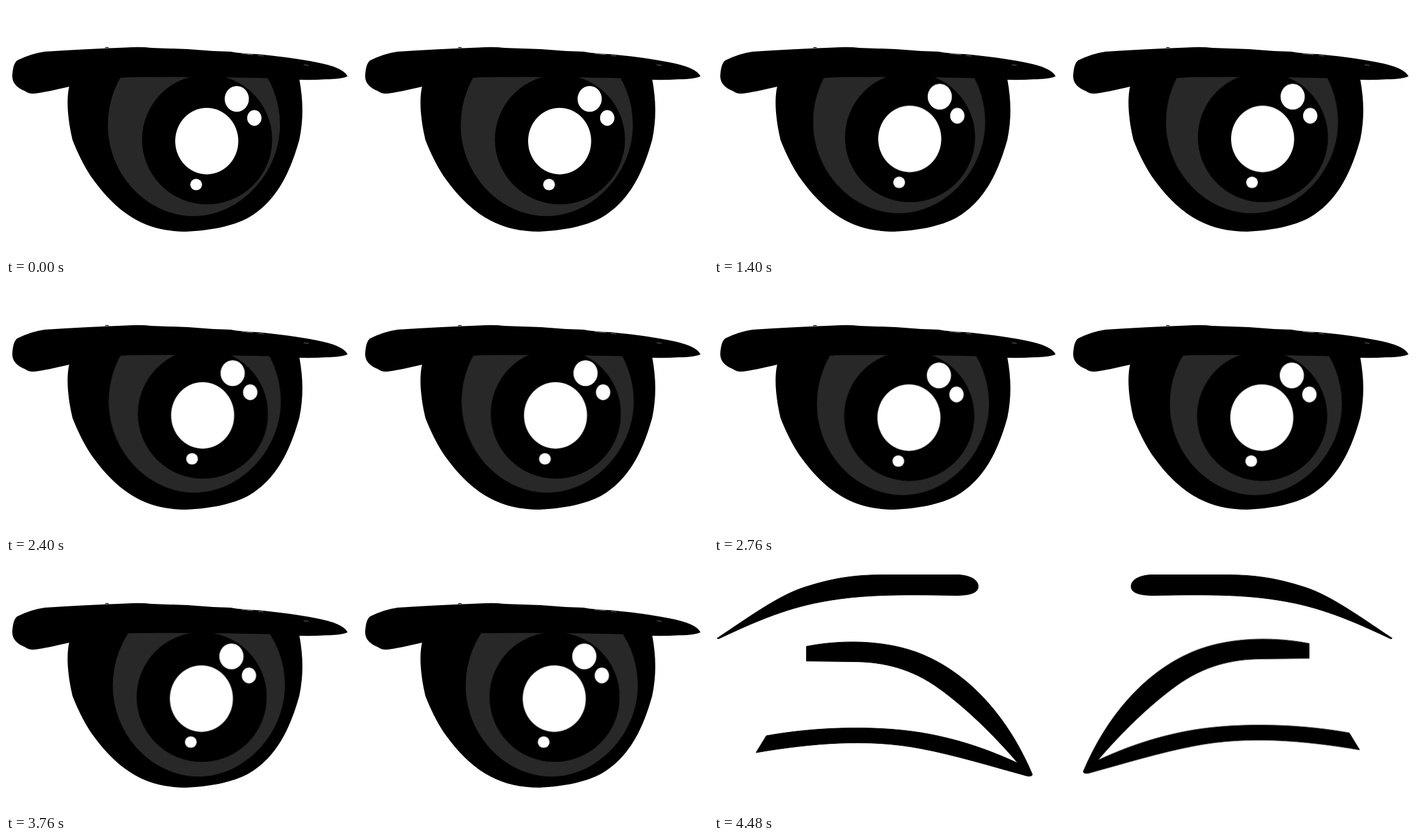
Write an HTML page that moves like this. It is 1120 px wide and 400 px high and loops after 4640 ms.

```html
<!DOCTYPE html>
<html lang="en">
<head>
<meta charset="utf-8">
<title>Wandering eyes</title>
<style>
  html, body { margin: 0; width: 100%; height: 100%; overflow: hidden; background: #fff; }
  svg { display: block; width: 1120px; height: 400px; }

  .iris, .pupil, .open, .squint { animation: 4640ms linear infinite; }
  .iris { animation-name: iris; fill: #282828; }
  .pupil { animation-name: pupil; }
  .open { animation-name: open; animation-timing-function: step-end; }
  .squint { animation-name: squint; animation-timing-function: step-end; stroke: #000; stroke-linejoin: round; }

  @keyframes iris {
    0% { transform: translate(0, 0); }
    15.9% { transform: translate(-5.7px, -6.2px); }
    25% { transform: translate(-6.7px, -3.7px); }
    43.1% { transform: translate(1px, -6.8px); }
    73.3% { transform: translate(2.2px, 8.5px); }
    92.9%, 100% { transform: translate(16.5px, 4.9px); }
  }
  @keyframes pupil {
    0% { transform: translate(0, 0); }
    25% { transform: translate(-8.9px, -2.2px); }
    47.6% { transform: translate(-5.1px, -7.9px); }
    73.3% { transform: translate(-14.2px, 4px); }
    92.9%, 100% { transform: translate(0, 0); }
  }
  @keyframes open { 0% { opacity: 1; } 96.55%, 100% { opacity: 0; } }
  @keyframes squint { 0% { opacity: 0; } 96.55%, 100% { opacity: 1; } }
</style>
</head>
<body>
<svg viewBox="0 0 1120 400">
  <defs>
    <clipPath id="below-lid">
      <path d="M90 118 L150 117 L195 114 Q290 112.4 420 115.5 L490 117 V400 H90 Z"/>
    </clipPath>
    <g id="ball">
      <path d="M101 128 C96 148 98 180 106 214 C114 235 124 255 135 272 C178 333 222 361 288 361
               C325 359 361 353 388 338 C435 310 455 260 468 214 C475 180 474 150 468 117
               L300 100 Z"/>
      <path d="M10 112 Q11 92 18 87 Q40 76 62 73 Q128 68.5 190 66.5 Q215 65 232 67
               L290 69 L330 72 L358 73 Q375 76 400 77 Q455 82 495 90 Q538 98 545 112.5
               Q536 117 510 117.3 Q490 118.5 468 118 L200 120 L101 129
               Q62 138 50 139.5 Q38 142 30 136 Q10 128 10 112 Z"/>
      <path d="M158 67 L161 66 L164 67" stroke="#000"/>
      <path d="M376 76.5 L394 78 M402 79.3 L411 79.8 M475 94 L483 95"
            stroke="#fff" stroke-width=".4" fill="none"/>
    </g>
    <path id="ring" d="M162.5 190.3 A137.3 145.9 0 0 1 437.1 190.3
      C437.1 267.6 372.6 336.2 299.8 336.2 C225 336.2 162.5 269.8 162.5 190.3 Z"/>
    <g id="core">
      <circle cx="320.8" cy="213.6" r="103.8"/>
      <g fill="#fff">
        <ellipse cx="320.3" cy="216.2" rx="50.3" ry="53.2"/>
        <ellipse cx="368.2" cy="148.6" rx="19.3" ry="20.6"/>
        <ellipse cx="396.2" cy="179.2" rx="11.4" ry="12.6"/>
        <ellipse cx="303.4" cy="285.7" rx="9.4" ry="9.1"/>
      </g>
    </g>
    <path id="brow" d="M5 122 C62 84 108 50 152 38 C200 23 235 20.5 275 20.5 H390
      C412 22 421.5 30 421.5 39 C421.5 48 412 53 388 53.5 C300 52 230 51 160 66 C100 79 50 103 7 123 Z"/>
    <path id="shut" d="M147.5 135 C213 122 285 127 335 149 C412 182 472 254 508 340
      Q507 343.5 500 342.5 C440 326 385 309 330 298.5 C245 282 155 290 67 305 L83.5 278
      C160 264 255 261 330 273 C390 283 440 301 485 322 C445 275 400 232 360 203
      C315 170 270 160 225 159.5 L147.5 158.5 Z"/>
    <g id="eye">
      <use href="#ball"/>
    </g>
  </defs>

  <g class="open">
    <g>
      <use href="#eye"/>
      <g clip-path="url(#below-lid)">
        <g class="iris"><use href="#ring"/></g>
        <g class="pupil"><use href="#core"/></g>
      </g>
    </g>
    <g transform="translate(563 0)">
      <use href="#eye"/>
      <g clip-path="url(#below-lid)">
        <g class="iris"><use href="#ring"/></g>
        <g class="pupil"><use href="#core"/></g>
      </g>
    </g>
  </g>

  <g class="squint">
    <use href="#brow"/>
    <use href="#shut"/>
    <use href="#brow" transform="translate(1087 0) scale(-1 1)"/>
    <use href="#shut" transform="translate(1097 -4.5) scale(-1 1)"/>
  </g>
</svg>
</body>
</html>
```
